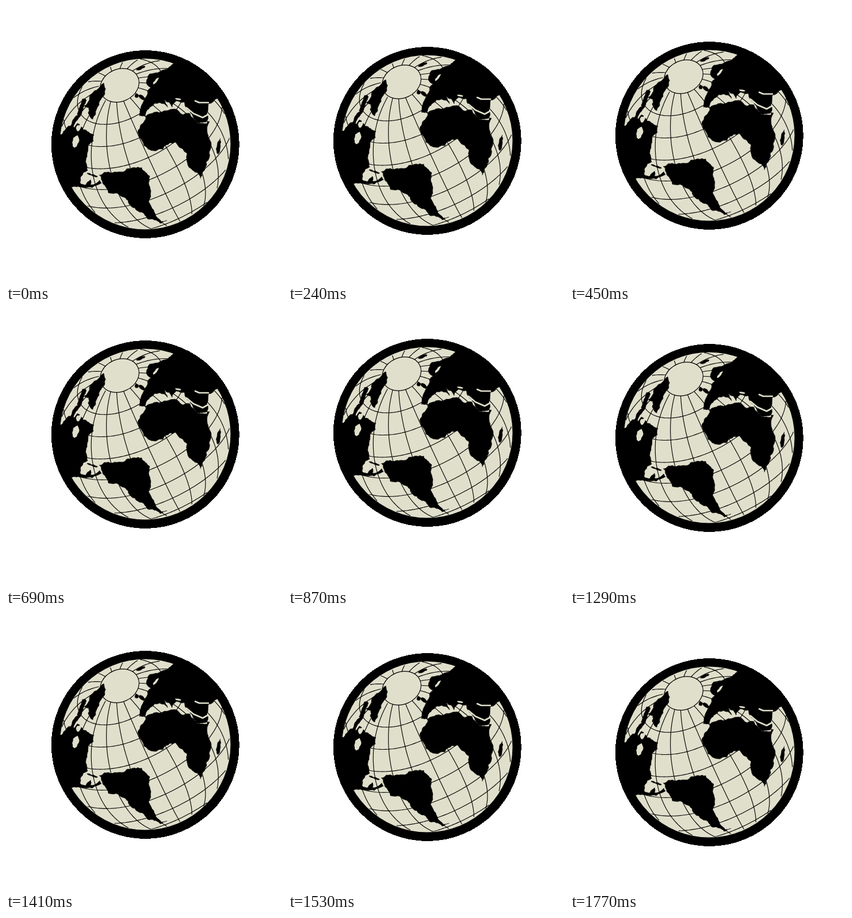
Recreate the animation shown at these times as an HTML page. Size 480 px wide and 480 px high, loop 1800 ms.

```html
<!DOCTYPE html>
<html lang="en">
<head>
<meta charset="utf-8">
<title>Floating globe</title>
<style>
  html, body { margin: 0; width: 100%; height: 100%; overflow: hidden; background: #fff; }
  svg { display: block; width: 480px; height: 480px; }
  .sea { fill: #e0dfcb; }
  .grid { fill: none; stroke: #000; stroke-width: 1.15; }
  .land { stroke: #000; stroke-width: .5; stroke-linejoin: round; }
  .strait { fill: none; stroke: #e0dfcb; stroke-width: 2.6; stroke-linecap: round; stroke-linejoin: round; }
</style>
</head>
<body>
<svg viewBox="0 0 480 480">
  <defs><clipPath id="disc"><circle cx="242" cy="240" r="152"/></clipPath></defs>
  <g id="globe">
    <circle cx="242.3" cy="240.5" r="163.5" shape-rendering="crispEdges"/>
    <circle class="sea" cx="242" cy="240" r="148.5"/>
    <g clip-path="url(#disc)">
      <path class="grid" id="grid"/>
      <ellipse class="sea" cx="197.5" cy="138" rx="35" ry="28" transform="rotate(-25 197.5 138)" stroke="#000" stroke-width="1.2"/>
      <path class="land" id="land"/>
      <path class="sea" id="lakes"/>
      <path class="strait" d="M314 177L326 187L342 194L351 189M329 165L336 168L352 168"/>
    </g>
  </g>
</svg>
<script>
// Corner points of the coasts; the ragged detail between them is seeded.
const COASTS = {
  africa: `243 192 262 184 280 182 294 179 308 189 320 187 334 204 354 201 350 220 357 240 354 262
    347 280 338 300 322 283 314 268 315 257 300 244 295 237 285 238 273 249 250 250 240 243 231 226 235 206`,
  southAmerica: `162 294 171 289 185 290 205 288 210 283 236 281 250 296 249 312 252 322 248 340 257 355
    260 366 270 375 280 373 268 378 246 370 224 351 208 334 196 327 178 325 172 312`,
  northAmerica: `60 225 97 224 112 214 124 204 134 215 153 224 152 235 143 242 141 262 142 286 130 297
    129 308 139 311 147 302 147 311 163 303 166 308 150 316 136 315 115 315 70 330`,
  greenland: '170 134 171 155 162 172 156 188 151 197 143 187 144 177 136 174 145 158 158 146',
  eurasia: `292 99 274 111 264 116 250 118 244 133 252 142 246 148 240 164 233 182 232 191 242 192
    252 175 267 168 281 176 275 163 289 176 296 165 310 167 314 178 330 200 350 204 352 170
    367 161 420 150 400 60 300 70`
};
// Centre, half width, half height, turn in degrees.
const ISLANDS = [
  [370, 244, 3.5, 13, 8], [234, 108, 8, 2.5, -20], [236, 159, 3, 7, -50],
  [227, 156, 3, 4, 0], [150, 294, 10, 1.5, 20]
];
const LAKES = [[121, 235, 5, 11, 15], [126, 212, 4, 6, 30], [261, 130, 2, 7, 40], [299, 162, 6, 1.5, 10]];

const R = 148, TILT = 25.5, CENTRE = 29.3, STEP = 18, BULGE = .75;
const rad = d => d * Math.PI / 180;
const $ = id => document.getElementById(id);
let seed = 7;
const random = () => (seed = seed * 16807 % 2147483647) / 2147483647;

// Splits an edge again and again, nudging each middle sideways.
function ragged([ax, ay], [bx, by]) {
  const dx = bx - ax, dy = by - ay;
  if (Math.hypot(dx, dy) < 5) return [[ax, ay]];
  const k = (random() - .5) * .3;
  const mid = [(ax + bx) / 2 - dy * k, (ay + by) / 2 + dx * k];
  return [...ragged([ax, ay], mid), ...ragged(mid, [bx, by])];
}

function coast(points) {
  const edge = points.flatMap((p, i) => ragged(p, points[(i + 1) % points.length]));
  return `M${edge.map(p => p.map(n => n.toFixed(1))).join('L')}Z`;
}

function parse(text) {
  const n = text.trim().split(/\s+/).map(Number);
  return n.flatMap((x, i) => i % 2 ? [] : [[x, n[i + 1]]]);
}

function blob([x, y, rx, ry, turn]) {
  const c = Math.cos(rad(turn)), s = Math.sin(rad(turn));
  return coast(Array.from({ length: 9 }, (_, i) => {
    const size = .8 + random() * .4;
    const u = rx * size * Math.cos(rad(i * 40)), v = ry * size * Math.sin(rad(i * 40));
    return [x + u * c - v * s, y + u * s + v * c];
  }));
}

// Azimuthal view, a little flatter than orthographic, with the pole leaning left.
function project(lat, lon) {
  const p = rad(lat), l = rad(lon), c = rad(CENTRE), t = rad(TILT);
  const x = Math.cos(p) * Math.sin(l);
  const y = Math.cos(p) * Math.sin(c) * Math.cos(l) - Math.sin(p) * Math.cos(c);
  const depth = Math.sin(p) * Math.sin(c) + Math.cos(p) * Math.cos(c) * Math.cos(l);
  if (depth < 0) return null;
  const angle = Math.acos(Math.min(1, depth));
  const k = R * Math.sin(BULGE * angle) / Math.sin(BULGE * Math.PI / 2) / (Math.sin(angle) || 1);
  return [
    242 + k * (x * Math.cos(t) + y * Math.sin(t)),
    240 + k * (y * Math.cos(t) - x * Math.sin(t))
  ];
}

function trace(from, to, at) {
  let d = '', pen = false;
  for (let a = from; a <= to; a += 2) {
    const q = at(a);
    if (q) d += (pen ? 'L' : 'M') + q.map(n => n.toFixed(1));
    pen = !!q;
  }
  return d;
}

let lines = '';
for (let lat = -3 * STEP; lat < 72; lat += STEP) lines += trace(-180, 180, a => project(lat, a));
for (let lon = -182.5; lon < 177; lon += STEP) lines += trace(-60, 74, a => project(a, lon));
$('grid').setAttribute('d', lines);

// The northern archipelago runs in slanting strips down to the western rim.
const arctic = Array.from({ length: 11 }, (_, i) => [
  140 - 3.8 * i + (random() - .5) * 10, 166 + 5.6 * i, 2 + random() * 2, 5 + random() * 4, 32
]);
const land = Object.values(COASTS).map(c => coast(parse(c)));
$('land').setAttribute('d', [...land, ...[...ISLANDS, ...arctic].map(blob)].join(''));
$('lakes').setAttribute('d', LAKES.map(blob).join(''));

// Time in ms and height in px: an eased rise, then a steady fall.
const BOB = [[0, 0], [240, 6], [540, 19], [690, 24], [900, 28], [1050, 26.4], [1770, 0], [1800, 0]];

function height(t) {
  const i = BOB.findIndex(k => k[0] > t);
  const [t0, y0] = BOB[i - 1], [t1, y1] = BOB[i];
  return Math.round(y0 + (y1 - y0) * (t - t0) / (t1 - t0));
}

function draw() {
  const t = Math.floor(performance.now() % 1800 / 30) * 30;
  $('globe').setAttribute('transform', `translate(0 ${-height(t)})`);
  requestAnimationFrame(draw);
}
draw();
</script>
</body>
</html>
```
